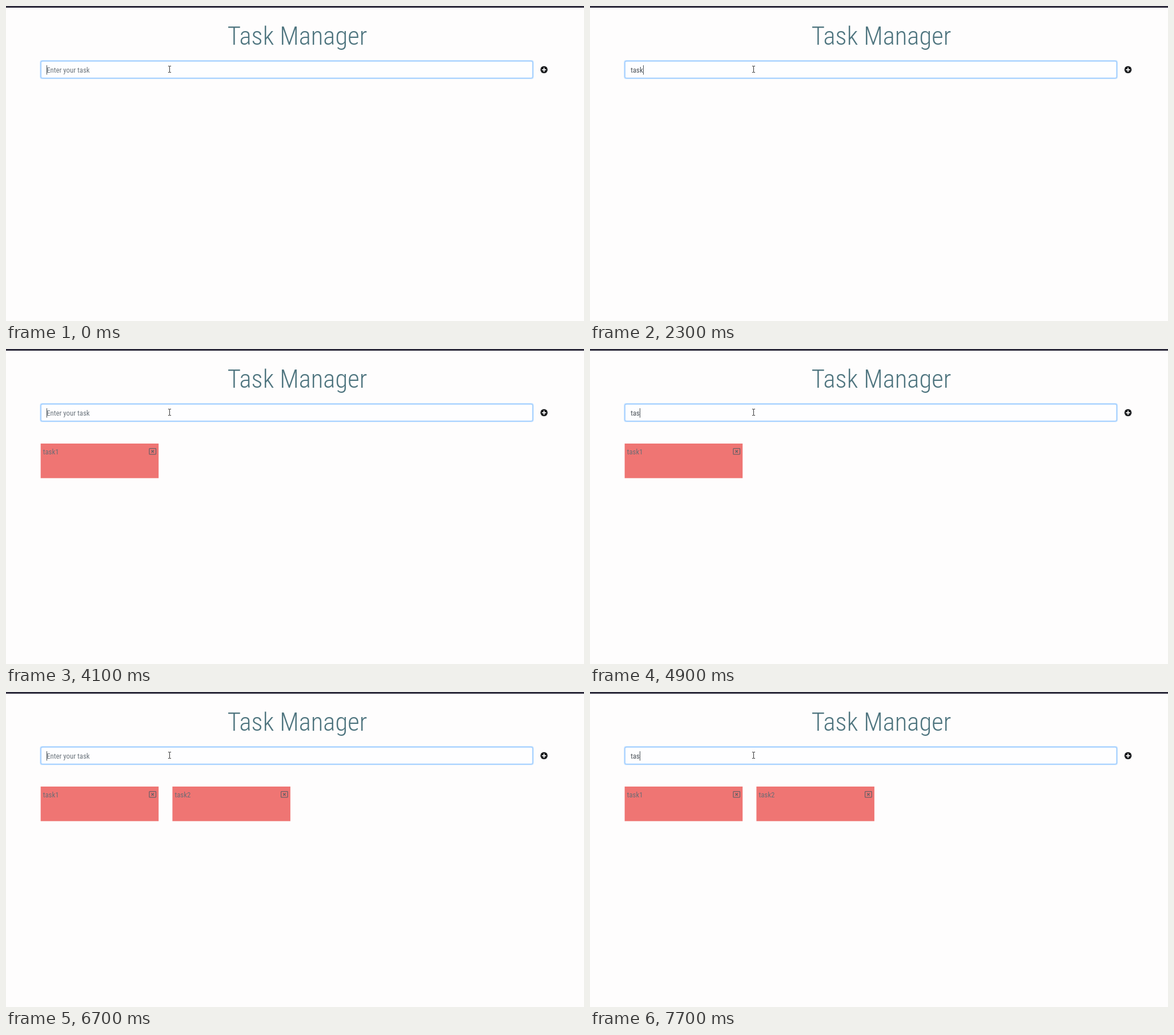
These frames come from a looping animation (1012 px wide and 553 px high, 8000 ms). An HTML page:

```html
<!DOCTYPE html>
<html lang="en">
<head>
<meta charset="utf-8">
<title>Task Manager</title>
<style>
  html, body { margin: 0; width: 100%; height: 100%; overflow: hidden; background: #fefdfd; }
  svg { display: block; }
  text {
    font: 400 12.8px "Roboto Condensed", Roboto, sans-serif;
    font-stretch: 75%;
    white-space: pre;
  }
  #title { font-size: 44.8px; font-weight: 300; fill: #4f757f; }
  .card text { fill: #6c6c74; }
</style>
</head>
<body>
<svg width="1012" height="553" viewBox="0 0 1012 553">
  <defs>
    <g id="close" fill="none" stroke="#6c6066">
      <rect x=".7" y=".7" width="11.6" height="10.2" rx=".8" stroke-width="1.3"/>
      <path d="M4.3 3.6l4.4 4.4m0-4.4l-4.4 4.4" stroke-width="1.5"/>
    </g>
  </defs>
  <rect width="1012" height="3" fill="#2d2b3c"/>
  <text id="title" x="510" y="68" text-anchor="middle">Task Manager</text>

  <rect x="59.4" y="95" width="864.5" height="33.2" rx="4" fill="#bfdeff"/>
  <rect x="61.3" y="97" width="860.7" height="29.4" rx="2.6" fill="#fefeff" stroke="#80bdff" stroke-width=".9"/>
  <text id="field" x="71.2" y="116.5"></text>
  <rect id="caret" y="104" width="1" height="16.5" fill="#495057"/>

  <circle cx="942" cy="111.8" r="6.3" fill="#17191c"/>
  <path d="M938.4 111.8h7.2m-3.6-3.6v7.2" stroke="#fefdfd" stroke-width="1.8"/>
  <path d="M284 105.5h2l.5.5.5-.5h2m-2.5.5v10m-2.5.5h2l.5-.5.5.5h2" fill="none" stroke="#333"/>

  <g id="cards"></g>
</svg>
<script>
const LOOP = 8000;
// [start ms, typed text, caret visible]
const typing = [
  [0, "", 1], [500, "", 0], [900, "t", 1], [1100, "tas", 1], [1700, "tas", 0],
  [2300, "task", 1], [2500, "task ", 1], [2900, "task ", 0], [3100, "task", 1],
  [3400, "task1", 1], [4100, "", 1], [4600, "", 0], [4700, "t", 1], [4800, "ta", 1],
  [4900, "tas", 1], [5300, "tas", 0], [5400, "task", 1], [6400, "task2", 1],
  [6500, "task2", 0], [6700, "", 1], [7500, "t", 1], [7700, "tas", 1]
];
const cards = [
  { name: "task1", x: 60.7, from: 4100 },
  { name: "task2", x: 291.4, from: 6700 }
];
const byId = id => document.getElementById(id);
const field = byId("field"), caret = byId("caret");

byId("cards").innerHTML = cards.map(({ name, x }) => `
  <g class="card" transform="translate(${x} 166)">
    <rect width="206.5" height="60.7" fill="#ef7573"/>
    <text x="4" y="18.5">${name}</text>
    <use href="#close" x="189.5" y="8"/>
  </g>`).join("");
const cardNodes = document.querySelectorAll(".card");

function draw(time) {
  const [, typed, blink] = typing.findLast(([start]) => start <= time);
  field.textContent = typed || "Enter your task";
  field.setAttribute("fill", typed ? "#495057" : "#6c757d");
  const width = typed ? field.getComputedTextLength() : 0;
  caret.setAttribute("x", Math.round(71 + width));
  caret.setAttribute("visibility", blink ? "visible" : "hidden");
  cards.forEach(({ from }, i) =>
    cardNodes[i].setAttribute("visibility", time >= from ? "visible" : "hidden"));
}

const begin = performance.now();
function tick() {
  draw((performance.now() - begin) % LOOP);
  requestAnimationFrame(tick);
}
tick();
</script>
</body>
</html>
```
